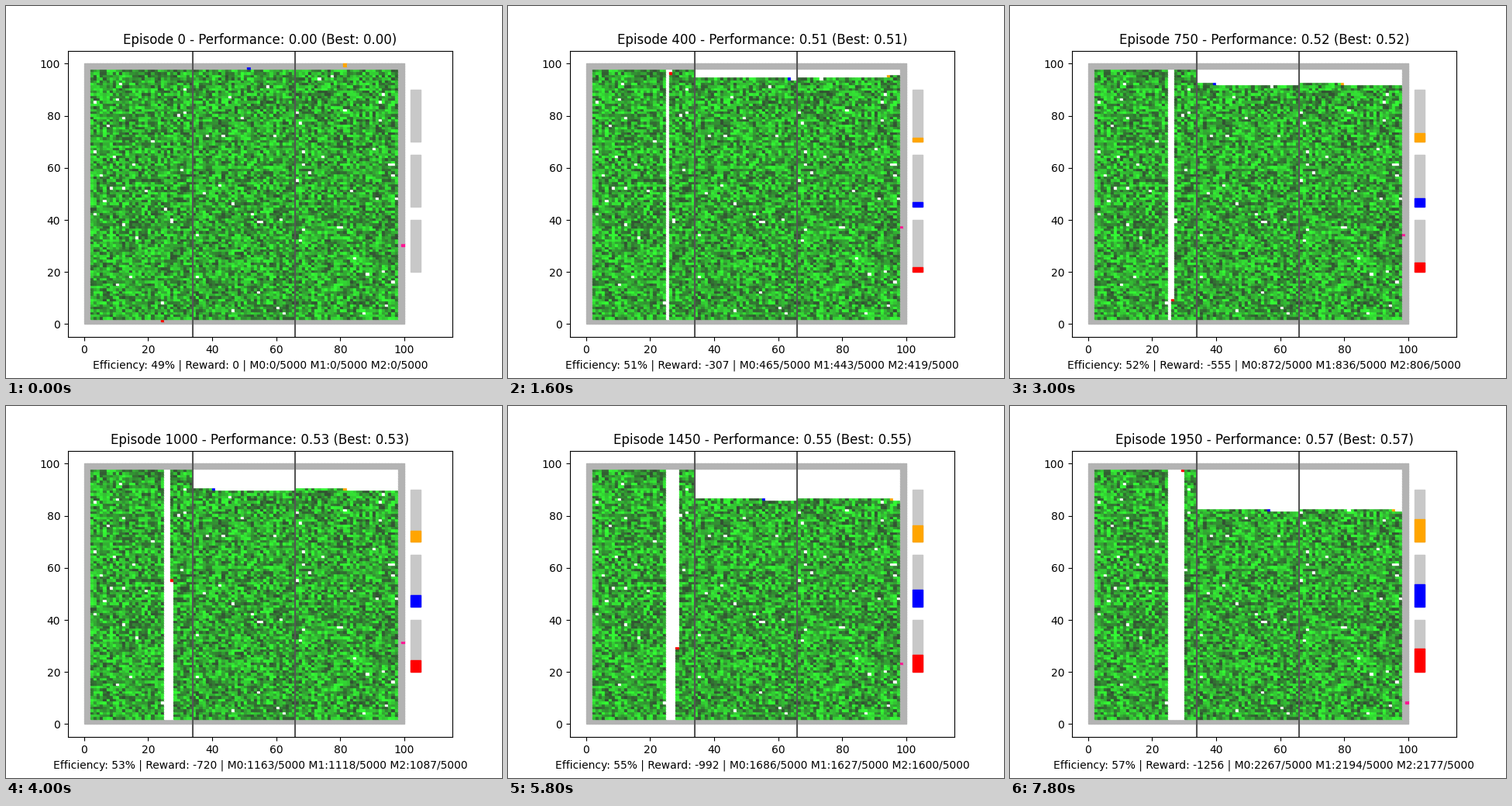
These frames come from a looping animation (640 px wide and 480 px high, 8 s). A matplotlib script:

```python
import numpy as np
import matplotlib.pyplot as plt
from matplotlib.animation import FuncAnimation
from matplotlib.patches import Rectangle

FRAMES, INTERVAL, STEP, GOAL = 40, 200, 50, 5000
LAST = (FRAMES - 1) * STEP
SIZE = 100
LOW, HIGH = 2, 97  # mowable cells inside the wall
ROWS = range(LOW, HIGH + 1)
PINK = (1, 0.08, 0.58)


def back_and_forth(lanes, lane):
    """Cells of neighbouring lanes, every second one taken backwards."""
    cells = []
    for i, k in enumerate(lanes):
        cells += lane(k)[::-1] if i % 2 else lane(k)
    return cells


def by_column(first):
    return back_and_forth(range(first, first + 6),
                          lambda x: [(x, y) for y in ROWS])


def by_row(left, right):
    return back_and_forth(ROWS[::-1],
                          lambda y: [(x, y) for x in range(left, right + 1)])


class Mower:
    def __init__(self, color, home, cells, mowed, score, power, base):
        self.color, self.path = color, [home] + cells
        self.mowed, self.score, self.power = mowed, score, power
        ax.add_patch(Rectangle((102, base), 3, 20, color="#c8c8c8"))
        self.bar = ax.add_patch(Rectangle((102, base), 3, 0, color=color))

    def advance(self, t, grid):
        """Mow up to time t in 0..1 and return the score."""
        done = t ** self.power
        n = round(self.mowed * done)
        for x, y in self.path[1:n]:
            grid[y, x] = 1
        x, y = self.path[n]
        grid[y, x] = self.color
        score = round(self.score * done)
        self.bar.set_height(20 * score / GOAL)
        self.bar.set_visible(score > 0)
        return score


def make_field():
    rng = np.random.default_rng(7)
    field = np.full((SIZE, SIZE, 3), 0.2)
    field[..., 1] = rng.uniform(0.3, 1, (SIZE, SIZE))
    bare = rng.integers(LOW, HIGH + 1, (2, 76))
    field[bare[0], bare[1]] = 1
    wall = np.ones((SIZE, SIZE), bool)
    wall[LOW:HIGH + 1, LOW:HIGH + 1] = False
    field[wall] = 0.7
    return field


def guard_cell(frame):
    """The guard patrols the right wall, swapping between its two columns."""
    y = np.interp(frame, [0, 8, 20, 29, 35, 39], [30, 37, 31, 23, 4, 8])
    return 99 - frame // 8 % 2, round(y)


FIELD = make_field()

fig, ax = plt.subplots(figsize=(6.4, 4.8), dpi=100)
edges = np.arange(SIZE + 1)
mesh = ax.pcolormesh(edges, edges, FIELD, edgecolors="face", linewidth=1,
                     antialiased=True)
for x in (34, 66):
    ax.axvline(x, color="#555555", lw=1.5)

mowers = [
    Mower((1, 0, 0), (24, 1), by_column(25), 480, 2267, 1.0, 20),
    Mower((0, 0, 1), (51, 98), by_row(34, 65), 490, 2194, 1.01, 45),
    Mower((1, 0.647, 0), (81, 99), by_row(66, 97), 483, 2177, 1.04, 70),
]

ax.set_xlim(-5, 115)
ax.set_ylim(-5, 105)
title = ax.set_title("")
status = ax.set_xlabel("")


def draw(frame):
    episode = frame * STEP
    grid = FIELD.copy()
    scores = [m.advance(episode / LAST, grid) for m in mowers]
    x, y = guard_cell(frame)
    grid[y, x] = PINK
    mesh.set_array(grid)

    percent = round(49.3 + 0.00113 * sum(scores))
    best = percent / 100 if frame else 0
    reward = round(episode * (0.00008 * episode - 0.8))
    title.set_text(f"Episode {episode} - Performance: {best:.2f} "
                   f"(Best: {best:.2f})")
    counts = " ".join(f"M{i}:{s}/{GOAL}" for i, s in enumerate(scores))
    status.set_text(f"Efficiency: {percent}% | Reward: {reward} | {counts}")
    return [mesh, title, status]


anim = FuncAnimation(fig, draw, frames=FRAMES, interval=INTERVAL,
                     repeat=True, repeat_delay=0, blit=False)
plt.show()
```
